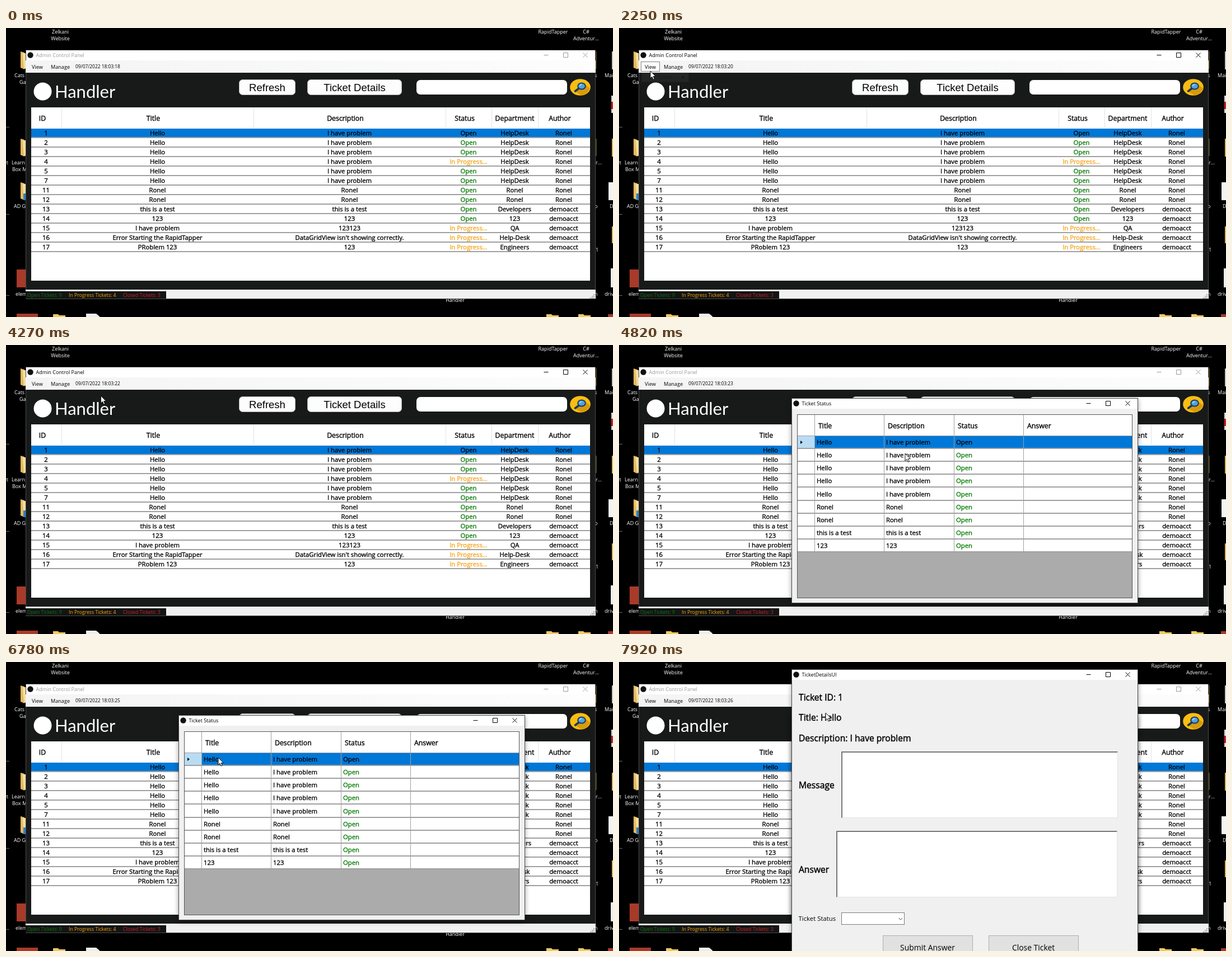
These frames come from a looping animation (1084x517 px, 7990 ms). An HTML page:

```html
<!DOCTYPE html>
<html lang="en">
<head>
<meta charset="utf-8">
<title>Ticket admin panel</title>
<style>
  html, body { margin: 0; width: 100%; height: 100%; overflow: hidden; background: #000; }
  svg { display: block; width: 1084px; height: 517px; font-family: "Open Sans", "Noto Sans", sans-serif; }
  text { white-space: pre; }
  .medium { font-weight: 500; stroke-width: .03em; }
  .button { font-family: "Liberation Sans", Arial, sans-serif; }
  .brand { font-family: Lato, sans-serif; }
  .chrome { color: #000; }
  .inactive .chrome { color: #999; }
  .dialog { filter: drop-shadow(0 2px 4px rgba(0, 0, 0, .4)); transform-origin: 617px 278px; }
</style>
</head>
<body>
<svg id="stage" viewBox="0 0 1084 517"></svg>
<script>
const LOOP = 7990;
const BLUE = '#0078d7', GREEN = '#007a00', ORANGE = '#f5a31a', LINE = '#a0a0a0';

const rect = (x, y, w, h, fill, extra = '') =>
  `<rect x="${x}" y="${y}" width="${w}" height="${h}" fill="${fill}" ${extra}/>`;
const path = (d, extra = '') => `<path d="${d}" ${extra}/>`;
const circle = (x, y, r, fill) => `<circle cx="${x}" cy="${y}" r="${r}" fill="${fill}"/>`;

// y is the middle of the capital letters
const text = (x, y, value, size, { fill = '#000', stroke = 'none', anchor = 'start', cls = '', id = '' } = {}) =>
  `<text x="${x}" y="${y + size * .36}" font-size="${size}" fill="${fill}" stroke="${stroke}" text-anchor="${anchor}" class="${cls}" id="${id}">${value}</text>`;
const bold = (x, y, value, size, { fill = '#000', ...options } = {}) =>
  text(x, y, value, size, { cls: 'medium', fill, stroke: fill, ...options });
const centred = (x, y, value, size, options = {}) => bold(x, y, value, size, { anchor: 'middle', ...options });

function windowFrame(x, y, w, h, title, body) {
  const right = x + w - 88.5, mid = y + 9.5;
  return rect(x, y, w, h, body) + rect(x, y, w, 19, '#fff') +
    rect(x + .5, y + .5, w - 1, h - 1, 'none', 'stroke="#4a4a4a"') +
    circle(x + 8.5, mid, 5.2, '#111') +
    `<g class="chrome">` +
    text(x + 18.5, mid, title, 9, { fill: 'currentColor' }) +
    path(`M${right - 4} ${mid}h8M${right + 31} ${mid - 4}h8v8h-8zM${right + 66} ${mid - 4}l8 8m0-8l-8 8`,
      'fill="none" stroke="currentColor"') + '</g>';
}

const tickets = [
  ...[1, 2, 3, 4, 5, 7].map(id => [id, 'Hello', 'I have problem', id !== 4, 'HelpDesk', 'Ronel']),
  ...[11, 12].map(id => [id, 'Ronel', 'Ronel', true, 'Ronel', 'Ronel']),
  [13, 'this is a test', 'this is a test', true, 'Developers', 'demoacct'],
  [14, '123', '123', true, '123', 'demoacct'],
  [15, 'I have problem', '123123', false, 'QA', 'demoacct'],
  [16, 'Error Starting the RapidTapper', "DataGridView isn't showing correctly.", false, 'Help-Desk', 'demoacct'],
  [17, 'PRoblem 123', '123', false, 'Engineers', 'demoacct'],
];

function desktop() {
  const label = (x, y, value, anchor = 'start') => text(x, y, value, 9, { fill: '#fff', anchor });
  const folder = (x, y) =>
    path(`M${x} ${y}l7 2v30l-7-3z`, 'fill="#e2b95a"') +
    path(`M${x + 3} ${y + 3}h19v26l-16 2z`, 'fill="#f3dc9c"');
  const flatFolder = x => path(`M${x} 517v-5h9l2 2h11v3z`, 'fill="#efc95f"');
  return [42, 198, 276].map(y => folder(26, y)).join('') +
    rect(31, 296, 6, 12, '#2f7fc4') +
    [42, 198].map(y => rect(1044, y, 11, 31, '#4b3f1c')).join('') +
    rect(19, 432, 32, 32, '#a83a2a') + rect(19, 511, 38, 30, '#a83a2a') +
    [84, 965, 1022].map(flatFolder).join('') +
    path('M143 517v-6h18l6 5v1z', 'fill="#eee"') + rect(1075, 512, 9, 5, '#a83a2a') +
    rect(1081, 121, 4, 31, '#ddd') + rect(1081, 132, 4, 13, '#c8202c') +
    rect(1076, 276, 10, 32, '#f4f4f4') + rect(1082, 355, 5, 30, '#e2b95a') +
    rect(1082, 198, 5, 32, '#e2b95a') + rect(1080, 430, 6, 34, '#eee') +
    rect(1082, 42, 5, 32, '#ccc') +
    label(97, 7, 'Zelkani', 'middle') + label(97, 18.5, 'Website', 'middle') +
    label(977, 7, 'RapidTapper', 'middle') +
    label(1036, 7, 'C#', 'middle') + label(1036, 18.5, 'Adventur...', 'middle') +
    label(15, 85, 'Cats') + label(24, 97, 'Ga') + label(-3, 241, 'rt') +
    label(10, 241, 'Learn') + label(11, 253, 'Box M') + label(14, 319, 'AD G') +
    [175, 331, 476].map(y => label(-1, y, '...')).join('') + label(17, 476, 'elem') +
    label(1069, 85, 'Main') + label(1051, 85, 's') + label(1053, 241, 'r...') +
    label(1078, 319, 'Do') + label(1051, 319, 'o') + label(1053, 397, '1') +
    label(1048, 476, 'm') + label(1069, 476, 'drive') + label(802, 487, 'Handler', 'middle');
}

function mainGrid() {
  const headers = [[65, 'ID'], [263, 'Title'], [606, 'Description'], [819, 'Status'], [908.5, 'Department'], [989, 'Author']];
  const centres = [71.5, 270.5, 613.5, 826, 908.5, 996];
  let out = rect(45, 142, 998, 310, '#fff') +
    path('M99.5 142v37M442.5 142v37M785.5 142v37M867.5 142v37M950.5 142v37', 'stroke="#e3e3e3"') +
    headers.map(([x, name]) => centred(x, 161.5, name, 12.3)).join('') +
    rect(45, 180, 998, 15, BLUE);
  tickets.forEach((ticket, row) => {
    const y = 188 + row * 17;
    ticket.forEach((value, col) => {
      const isStatus = col === 3;
      const fill = isStatus && row ? (value ? GREEN : ORANGE) : '#000';
      out += centred(centres[col], y, isStatus ? (value ? 'Open' : 'In Progress...') : value, 11.3, { fill });
    });
    out += rect(45, y + 7, 998, 2, LINE);
  });
  return out;
}

function searchButton() {
  return '<ellipse cx="1025.5" cy="106" rx="18.3" ry="14.8" fill="#fbbd12"/>' +
    path('M1033 100l10 8q-3 9-15 12.5l-12-7z', 'fill="#d99a0b"') +
    path('M1022.5 108.5l-6 4.5', 'stroke="#173b63" stroke-width="3.6" stroke-linecap="round"') +
    '<ellipse cx="1028" cy="104" rx="6.8" ry="5.6" fill="#4fa3e3" stroke="#173b63" stroke-width="2"/>' +
    path('M1024.5 104q1-3 4-3', 'fill="none" stroke="#c9e8ff" stroke-width="1.2"');
}

function mainWindow() {
  const button = (x, w, name) =>
    rect(x + .5, 92.5, w - 1, 27, '#fdfdfd', 'rx="6" stroke="#b5b5b5"') +
    text(x + w / 2, 106, name, 18.5, { anchor: 'middle', cls: 'button' });
  let grip = '';
  for (let i = 0; i < 3; i++)
    for (let j = 0; j <= i; j++) grip += rect(1049 - j * 3, 476 + i * 3, 2, 2, '#a5a5a5');
  return windowFrame(35, 39, 1018, 446, 'Admin Control Panel', '#181a1a') +
    rect(35, 58, 1018, 22, 'url(#strip)') +
    rect(39.5, 60.5, 33, 17, '#fff', 'id="viewBox"') +
    text(46, 69.5, 'View', 9.1) + text(80, 69.5, 'Manage', 9.1) +
    text(124, 69, '', 8.4, { id: 'clock' }) +
    circle(65.5, 113.5, 16, '#fff') +
    text(87, 113.5, 'Handler', 31, { fill: '#fff', cls: 'brand' }) +
    button(416, 101, 'Refresh') + button(538, 169, 'Ticket Details') +
    rect(733, 93, 269, 26, '#fff', 'rx="7"') + searchButton() + mainGrid() +
    rect(35, 468, 1018, 16, '#f0f0f0') + rect(35, 471, 251, 13, '#131515') +
    text(38, 477.5, 'Open Tickets: 9', 8.7, { fill: '#087808' }) +
    text(112, 477.5, 'In Progress Tickets: 4', 8.7, { fill: '#ffa500' }) +
    text(209, 477.5, 'Closed Tickets: 3', 8.7, { fill: '#e01c24' }) + grip;
}

function menus() {
  const item = (y, name) => text(152, y, name, 9.1);
  return '<g id="menu">' + rect(40.5, 79.5, 84, 17, '#fdfdfd', 'stroke="#999"') +
    rect(41.5, 80.5, 82, 15, '#b3d7f3', 'id="ticketsHover" stroke="#2a86d1"') +
    text(67, 88, 'Tickets', 9.1) + path('M113 85l3.5 3-3.5 3z') + '</g>' +
    '<g id="submenu">' + rect(124.5, 79.5, 124, 53, '#fdfdfd', 'stroke="#999"') +
    rect(126.5, 80.5, 120, 16, '#b3d7f3', 'id="openHover" stroke="#2a86d1"') +
    item(89, 'Open') + item(106, 'In Progres...') + item(123, 'Closed') + '</g>';
}

function statusDialog() {
  const columns = [353, 477, 602];
  let out = windowFrame(308, 95, 619, 367, 'Ticket Status', '#f0f0f0') +
    rect(318.5, 124.5, 598, 328, '#ababab', 'stroke="#555"') + rect(319, 125, 597, 245, '#fff');
  [[356, 'Title'], [480, 'Description'], [605, 'Status'], [729, 'Answer']]
    .forEach(([x, name]) => out += bold(x, 145, name, 12.3));
  out += rect(350, 163, 566, 21, BLUE) + rect(319, 163, 30, 21, '#b9dcf5') + path('M324 171l4 3-4 3z');
  tickets.filter(ticket => ticket[3]).forEach(([, title, description], row) => {
    const y = Math.round(173.8 + row * 23.2);
    out += rect(319, y + 10, 597, 2, LINE);
    [title, description, 'Open'].forEach((value, col) =>
      out += bold(columns[col], y, value, 11.3, { fill: col === 2 && row ? GREEN : '#000' }));
  });
  return out + path('M319 162.5h597M349.5 125v245M473.5 125v245M598.5 125v245M722.5 125v245', `stroke="${LINE}"`);
}

function detailsDialog() {
  const label = (y, value) => bold(321, y, value, 15.6);
  const field = (x, y, w, h) => rect(x, y, w, h, '#fff') +
    path(`M${x} ${y + h}V${y}h${w}`, 'fill="none" stroke="#777" stroke-width="2"') +
    path(`M${x} ${y + h - .5}h${w - .5}v${-h}`, 'fill="none" stroke="#e3e3e3"');
  const button = (x, name) => rect(x + .5, 489.5, 160, 42, '#e1e1e1', 'stroke="#adadad"') +
    text(x + 80, 511, name, 13.9, { anchor: 'middle' });
  return windowFrame(308, 13, 619, 540, 'TicketDetailsUI', '#f0f0f0') +
    label(63.5, 'Ticket ID: 1') + label(99.5, 'Title: Hello') +
    label(136, 'Description: I have problem') + label(220.5, 'Message') + label(371, 'Answer') +
    field(398, 161, 493, 118) + field(389, 303, 501, 118) +
    text(320.5, 459, 'Ticket Status', 11.4) +
    rect(397.5, 448.5, 112, 21, '#fff', 'stroke="#7a7a7a"') +
    path('M499.5 458l3.2 3.2 3.2-3.2', 'fill="none" stroke="#444"') +
    button(471, 'Submit Answer') + button(660, 'Close Ticket');
}

document.getElementById('stage').innerHTML =
  '<defs><linearGradient id="strip"><stop stop-color="#f4f4f4"/><stop offset="1" stop-color="#fdfdfd"/></linearGradient></defs>' +
  rect(0, 0, 1084, 517, '#000') + desktop() +
  `<g id="main">${mainWindow()}</g>${menus()}` +
  `<g id="status" class="dialog">${statusDialog()}</g>` +
  `<g id="details" class="dialog">${detailsDialog()}</g>` +
  path('M0 0v13l3-2.7 2.1 4.9 2.2-1-2.1-4.7h4.1z', 'id="cursor" fill="#fff" stroke="#000" stroke-width=".9"');

const part = Object.fromEntries(
  [...document.querySelectorAll('[id]')].filter(el => el.id).map(el => [el.id, el]));

// time, x, y
const route = [
  [610, 584, 362], [800, 390, 235], [980, 150, 100], [1110, 30, 44], [1190, 7, 52], [1360, 50, 71],
  [1410, 51, 72], [1900, 51, 72], [1920, 56, 77], [2350, 56, 77], [2500, 62, 84], [2820, 80, 84],
  [3010, 80, 84], [3080, 96, 90], [3200, 193, 92], [3390, 193, 92], [3440, 165, 91],
  [3700, 164, 91], [4010, 169, 91], [4640, 170, 91], [4820, 510, 194], [5020, 691, 225],
  [5390, 557, 205], [5470, 550, 215], [5720, 470, 289], [5960, 390, 235], [6230, 480, 200],
  [6420, 565, 211], [6780, 379, 171], [7420, 379, 171], [7640, 637, 194], [7920, 369, 91],
];

const progress = (t, from, to) => Math.min(1, Math.max(0, (t - from) / (to - from)));
const between = (t, from, to) => t >= from && t < to;
const show = (el, visible) => el.setAttribute('visibility', visible ? 'visible' : 'hidden');

function cursorAt(t) {
  const next = route.findIndex(point => point[0] > t);
  if (next < 1) return route[next ? route.length - 1 : 0].slice(1);
  const [t0, x0, y0] = route[next - 1], [t1, x1, y1] = route[next];
  const k = progress(t, t0, t1);
  return [x0 + (x1 - x0) * k, y0 + (y1 - y0) * k];
}

function render(t) {
  const [x, y] = cursorAt(t);
  part.cursor.setAttribute('transform', `translate(${x} ${y})`);
  show(part.cursor, t >= 610);

  const seconds = 18 + Math.max(0, Math.floor((t - 670) / 1004) + 1);
  part.clock.textContent = `09/07/2022 18:03:${seconds}`;
  part.main.classList.toggle('inactive', !between(t, 1550, 4340));

  const pressed = t >= 2120;
  show(part.viewBox, between(t, 1680, 4200));
  part.viewBox.setAttribute('fill', pressed ? '#fdfdfd' : '#b3d7f3');
  part.viewBox.setAttribute('stroke', pressed ? '#888' : BLUE);

  const menuOpen = between(t, 2240, 4200);
  part.menu.style.opacity = menuOpen ? progress(t, 2245, 2370) : 0;
  part.submenu.style.opacity = menuOpen ? progress(t, 2690, 2820) : 0;
  show(part.ticketsHover, t >= 2450);
  show(part.openHover, x >= 125 && t >= 3080);

  const opening = progress(t, 4340, 4460);
  part.status.style.opacity = opening;
  part.status.style.transform = opening < 1 ? `scale(${.9 + .1 * opening})` : 'none';
  show(part.details, t >= 7230);
}

function tick() {
  render(performance.now() % LOOP);
  requestAnimationFrame(tick);
}
tick();
</script>
</body>
</html>
```
